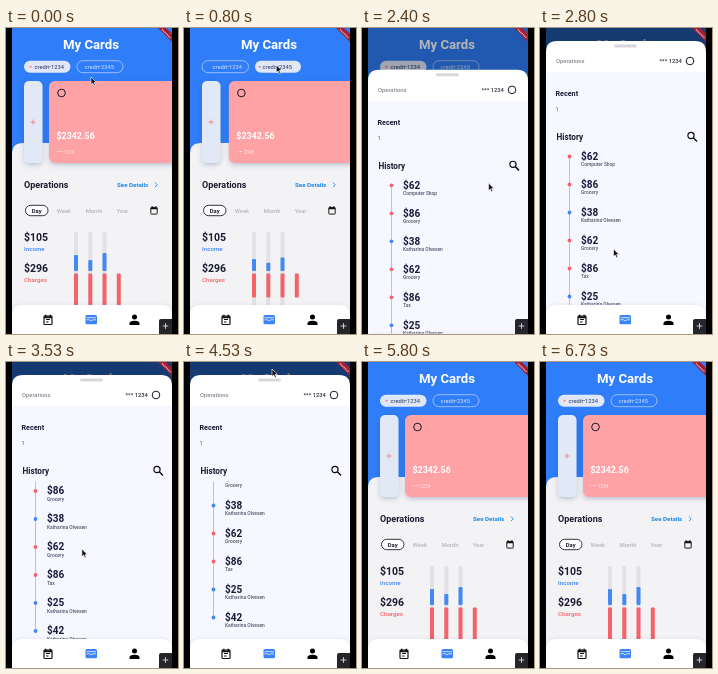
Write an HTML page that moves like this. It is 172x306 px and loops after 6.87 s.

```html
<!DOCTYPE html>
<html lang="en">
<head>
<meta charset="utf-8">
<style>
  html, body { margin: 0; height: 100%; overflow: hidden; background: #000; }
  svg { display: block; width: 100vw; height: 100vh; font-family: Roboto, sans-serif; }
  .b { font-weight: 700; }
  .m { font-weight: 500; }
  .chip rect { fill: none; stroke: #c4d9ff; stroke-width: .7; }
  .chip text { fill: #d5e4ff; font-size: 5.8px; }
  .chip circle { fill: none; }
  .chip.on rect { fill: #dfe7f8; stroke: none; }
  .chip.on text { fill: #27355c; }
  .chip.on circle { fill: #f5777d; }
</style>
</head>
<body>
<svg viewBox="0 0 172 306">
  <defs>
    <clipPath id="phone"><rect x="6" width="160" height="306"/></clipPath>
    <clipPath id="listArea"><rect x="6" y="119.500" width="160" height="187"/></clipPath>
    <filter id="shadow" x="-30%" y="-30%" width="160%" height="160%">
      <feDropShadow dx="0" dy="2" stdDeviation="2.500" flood-color="#304070" flood-opacity=".28"/>
    </filter>
    <g id="calendar" fill="none" stroke="#111">
      <rect x="-4" y="-3.800" width="8" height="8.300" rx=".8" stroke-width="1.200"/>
      <path d="M-4-2.500H4M-2.300-5.200V-3M2.300-5.200V-3" stroke-width="1.600"/>
    </g>
    <g id="nav">
      <path d="M6 306V288Q6 277 17 277H155Q166 277 166 288V306Z" fill="#fff" filter="url(#shadow)"/>
      <use href="#calendar" x="42" y="292"/>
      <path d="M40 291.500h4M40 294h2.500" stroke="#111"/>
      <rect x="79.500" y="287" width="11.500" height="9.300" rx="1.500" fill="#3c83f5"/>
      <path d="M80.500 289.700H90M80.500 291.800H83.500L85 293L86.800 291.800H90" fill="none" stroke="#dbe8ff" stroke-width=".9"/>
      <circle cx="128.500" cy="289" r="2.500"/>
      <path d="M123.500 297V295.500Q123.500 292.700 128.500 292.700T133.500 295.500V297Z"/>
    </g>
  </defs>

  <g clip-path="url(#phone)">
    <rect x="6" width="160" height="306" fill="#2f7df8"/>
    <path d="M6 306V126Q6 115 17 115H155Q166 115 166 126V306Z" fill="#f3f3f5"/>
    <text class="b" x="85" y="21" font-size="13.200" text-anchor="middle" fill="#fff">My Cards</text>
    <g class="chip">
      <rect x="18" y="32.700" width="46.500" height="12" rx="6"/>
      <circle cx="24.500" cy="38.800" r="1"/>
      <text x="28.500" y="40.800">credit•1234</text>
    </g>
    <g class="chip">
      <rect x="71" y="32.700" width="46" height="12" rx="6"/>
      <circle cx="75.500" cy="38.800" r="1"/>
      <text x="78.500" y="40.800">credit•2345</text>
    </g>
    <rect x="18" y="53" width="18.500" height="82" rx="5" fill="#e1e8f6" filter="url(#shadow)"/>
    <path d="M24.500 94H29.500M27 91.500V96.500" stroke="#f5858b" stroke-width=".9"/>
    <g id="card">
      <rect x="43" y="53" width="140" height="82" rx="6" fill="#ffa2a6" filter="url(#shadow)"/>
      <circle cx="55.500" cy="65" r="3.800" fill="none" stroke="#171727" stroke-width="1"/>
      <text class="b" x="50.500" y="111" font-size="8.900" fill="#fff">$2342.56</text>
      <text id="digits" x="50.500" y="126" font-size="4.600" fill="#fff" opacity=".75"></text>
    </g>

    <g class="b" fill="#1b1b33">
      <text x="18" y="160" font-size="9">Operations</text>
      <text x="111" y="159" font-size="6.200" fill="#1687ea">See Details</text>
      <path d="M149 154.500l2.200 2.300l-2.200 2.300" fill="none" stroke="#1687ea" stroke-width=".9"/>
      <rect x="19.500" y="177.300" width="22.500" height="10.400" rx="5.200" fill="#fff" stroke="#1b1b33" stroke-width=".9"/>
      <g font-size="5.800" text-anchor="middle">
        <text x="30.700" y="184.700">Day</text>
        <g fill="#b4b4bb" class="m">
          <text x="58" y="184.700">Week</text>
          <text x="88" y="184.700">Month</text>
          <text x="116.500" y="184.700">Year</text>
        </g>
      </g>
      <use href="#calendar" transform="translate(148 182.500) scale(.8)"/>
      <text x="18" y="213" font-size="10.500">$105</text>
      <text x="18" y="223" font-size="6.200" class="m" fill="#3f86f2">Income</text>
      <text x="18" y="243.500" font-size="10.500">$296</text>
      <text x="18" y="254" font-size="6.200" class="m" fill="#f5636a">Charges</text>
    </g>
    <g id="chart"></g>
    <use href="#nav"/>

    <rect id="dim" x="6" width="160" height="306"/>
    <g id="sheet">
      <path d="M6 320V24Q6 13 17 13H155Q166 13 166 24V320Z" fill="#fff"/>
      <rect x="6" y="44" width="160" height="280" fill="#f6f7ff"/>
      <rect x="74" y="16.500" width="23" height="3" rx="1.500" fill="#d8d8dc"/>
      <text class="m" x="16" y="35" font-size="5.800" fill="#85858f">Operations</text>
      <text class="m" x="119.500" y="35" font-size="5.800" fill="#30303f">*** 1234</text>
      <circle cx="150" cy="33" r="3.800" fill="none" stroke="#171727"/>
      <g fill="#1b1b33">
        <text class="b" x="15.500" y="68" font-size="7.200">Recent</text>
        <text x="15.500" y="83" font-size="5.500" fill="#555568">1</text>
        <text class="b" x="16.500" y="112.300" font-size="8.200">History</text>
      </g>
      <path d="M153.300 109.800L157 113.500" stroke="#111" stroke-width="1.500"/>
      <circle cx="151" cy="107.500" r="3.100" fill="none" stroke="#111" stroke-width="1.200"/>
      <g clip-path="url(#listArea)"><g id="list"></g></g>
      <use href="#nav"/>
    </g>

    <path d="M152 0H160L166 6V14Z" fill="#a51c35"/>
    <path d="M156 1.500L165 10.500" stroke="#e9c5cc" stroke-width="1.500" stroke-dasharray="1 .8"/>
  </g>
  <path d="M153 306V293Q153 291 155 291H166V306Z" fill="#25252b"/>
  <path d="M156.700 298H162.300M159.500 295.200V300.800" stroke="#ddd" stroke-width=".9"/>
  <path id="cursor" d="M0 0V7.500L1.800 6L3 8.700L4.300 8.100L3.100 5.500H5.500Z" fill="#111" stroke="#fff" stroke-width=".6"/>
</svg>
<script>
const LOOP = 6870, RED = '#f5636a', BLUE = '#4389f3';
const $ = id => document.getElementById(id);
const chips = document.querySelectorAll('.chip');
const clamp = v => Math.min(1, Math.max(0, v));
const span = (t, start, length) => clamp((t - start) / length);
const easeOut = u => 1 - (1 - u) ** 3;
const smooth = u => u * u * (3 - 2 * u);
const move = (el, x, y) => el.setAttribute('transform', `translate(${x} ${y})`);

const history = [
  [62, 'Computer Shop'], [86, 'Grocery'], [38, 'Katharina Olvesen', 1], [62, 'Grocery'],
  [86, 'Tax'], [25, 'Katharina Olvesen', 1], [42, 'Katharina Olvesen', 1]
];
$('list').innerHTML = history.map(([sum, label, income], i) => {
  const y = 128.5 + i * 28, color = income ? BLUE : RED;
  const line = i < history.length - 1
    ? `<path d="M29.500 ${y}v28" stroke="${color}" stroke-width=".9" opacity=".55"/>` : '';
  return `${line}<circle cx="29.500" cy="${y}" r="1.900" fill="${color}"/>
    <text class="b" x="41" y="${y + 3.3}" font-size="10" fill="#1b1b3d">$${sum}</text>
    <text class="m" x="41" y="${y + 9.8}" font-size="4.900" fill="#55556a">${label}</text>`;
}).join('');

// x, income height, charges height
const bars = [[70, 16, 32], [84.3, 11, 32], [98.5, 18, 32], [112.8, 0, 32]];
const bar = (x, y, h, color) =>
  `<rect x="${x - 2}" y="${y}" width="4" height="${h}" rx="1" fill="${color}"/>`;
function drawChart(grow) {
  $('chart').innerHTML = bars.map(([x, income, charges]) =>
    (income ? bar(x, 204, 80, '#e2e2e6') + bar(x, 243 - income * grow, income * grow, BLUE) : '') +
    bar(x, 245.5, charges * grow, RED)).join('');
}

// time, x, y of the pointer tip
const path = [
  [0, 85, 49], [350, 94, 37], [750, 94, 37], [1250, 36, 37], [1600, 36, 37],
  [2100, 126.5, 155], [2450, 126.5, 155], [2800, 73.5, 221], [3100, 73.5, 225],
  [3600, 76, 185], [3850, 76, 180], [4400, 88, 7], [5350, 88, 7], [6000, 92, -14], [LOOP, 92, -14]
];
function pointer(t) {
  const i = path.findIndex(p => p[0] > t);
  const [t0, x0, y0] = path[i - 1], [t1, x1, y1] = path[i];
  const u = smooth(span(t, t0, t1 - t0));
  move($('cursor'), x0 + (x1 - x0) * u, y0 + (y1 - y0) * u);
}

function frame(now) {
  const t = now % LOOP;
  const second = t >= 500 && t < 1380;
  const load = t < 500 ? 1 : span(t, second ? 500 : 1380, 400);
  chips[0].classList.toggle('on', !second);
  chips[1].classList.toggle('on', second);
  $('digits').textContent = '•••• ' + (second ? 2345 : 1234);
  move($('card'), 123 * (1 - easeOut(load)), 0);
  drawChart(load);

  const open = span(t, 2250, 280), close = span(t, 4620, 230);
  move($('sheet'), 0, 295 * (1 - easeOut(open) + smooth(close)));
  $('dim').setAttribute('opacity', .54 * open * (1 - close));
  move($('list'), 0, -41 * smooth(span(t, 3100, 700)));
  pointer(t);
  requestAnimationFrame(frame);
}
requestAnimationFrame(frame);
</script>
</body>
</html>
```
